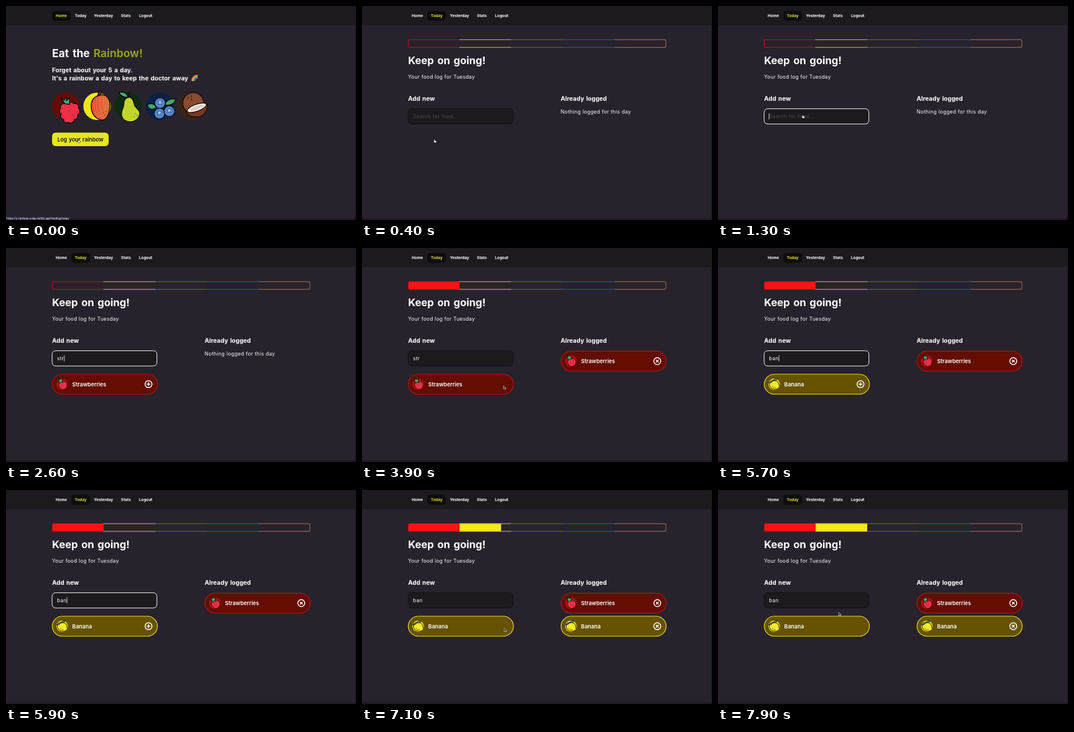
An HTML page that plays this animation: 600 by 368 pixels, repeating every 8 s.

```html
<!DOCTYPE html>
<html lang="en">
<head>
<meta charset="utf-8">
<title>Eat the Rainbow</title>
<style>
  html, body { margin: 0; height: 100%; overflow: hidden; background: #28222c; }
  svg { display: block; width: 100vw; height: 100vh; font-family: Inter, sans-serif; fill: #fff; }
  .nav { font-size: 6.7px; font-weight: 700; }
  .title, .lead, .sub, .button { font-weight: 700; word-spacing: .1em; }
  .lead { font-size: 10.5px; }
  .sub { font-size: 10.5px; }
  .button { font-size: 9.2px; font-weight: 600; }
  .body { font-size: 8.6px; letter-spacing: .045em; }
  .label { font-size: 9.35px; font-weight: 600; }
  .status { font: 500 4.6px "Noto Sans", sans-serif; }
  .ink { stroke: #120d12; stroke-width: 1.5; stroke-linejoin: round; }
  .thin { stroke: #120d12; stroke-width: .9; stroke-linejoin: round; }
  .icon { fill: none; stroke: #fff; stroke-width: 1.5; }
</style>
</head>
<body>
<svg viewBox="0 0 600 368" xmlns="http://www.w3.org/2000/svg">
  <defs>
    <linearGradient id="spectrum" gradientUnits="userSpaceOnUse" x1="79" x2="521"></linearGradient>
    <linearGradient id="mangoSkin"><stop stop-color="#e8453f"/><stop offset="1" stop-color="#df7a3a"/></linearGradient>
    <clipPath id="barShape"><rect x="79" y="57.5" width="442" height="14" rx="3"/></clipPath>
    <g id="strawberry">
      <circle r="10" fill="#ad1118"/>
      <path class="thin" fill="#ee3048" d="M-5-4C0-7 9-5 8.500 2C8 7 3 10 0 9C-5 7-8 0-5-4Z"/>
      <path fill="#3fb56c" class="thin" d="M-8-6L-5-7L-6-10L-2-8L1-9L0-5L2-3L-2-4L-4-1L-5-5Z"/>
      <path stroke="#7a1022" stroke-width=".9" stroke-dasharray=".8 2" d="M-2 0L3 6M2-2L6 2"/>
    </g>
    <g id="lemon">
      <circle r="10" fill="#d9cb12"/>
      <path class="thin" fill="#f6eb25" d="M-3-6C3-8 9-3 8.500 3Q10 6 7 7C2 11-7 8-8 1C-8-3-6-5-3-6Z"/>
      <path class="thin" fill="#3fa356" d="M-2-6Q-8-6-9-2Q-4-2-2-6ZM-2-6Q1-11 5-9Q3-5-2-6Z"/>
      <path fill="none" stroke="#3a3208" stroke-width=".7" d="M-4 3Q-2 7 3 6"/>
    </g>
  </defs>

  <rect width="600" height="368" fill="#28222c"/>
  <rect width="600" height="33" fill="#1c1a1e"/>
  <path d="M0 366.500H600M599.500 0V368" stroke="#1f1524" stroke-width="2"/>
  <rect id="pill" y="8.500" width="32" height="17" rx="5" fill="#0d0c0e"/>
  <g id="nav" class="nav"></g>

  <g id="home">
    <text class="title" x="79" y="87.500" font-size="18.600">Eat the <tspan fill="#919d19">Rainbow!</tspan></text>
    <text class="lead" x="79" y="114.300">Forget about your 5 a day.</text>
    <text class="lead" x="79" y="127.800">It's a rainbow a day to keep the doctor away</text>
    <g id="rainbow" fill="none" stroke-width="1.300"></g>
    <g id="discs"></g>

    <g class="ink">
      <path fill="#ee3048" d="M93 176C92 169 99 166 104 168C108 164 114 165 116 168C121 166 126 171 124 175C128 179 127 185 123 187C124 192 121 195 117 195C116 201 110 203 107 200C102 202 98 199 99 195C94 194 92 189 95 186C91 184 91 179 93 176Z"/>
      <path fill="#3fb57c" d="M94 158L100 162L102 156L104 163L109 157L109 169L101 168Z"/>
    </g>
    <path fill="none" stroke="#7a1022" stroke-width="1.500" stroke-linecap="round" d="M114 188h0M119 186h0M117 191h0M109 180h0"/>

    <g class="ink">
      <path fill="url(#mangoSkin)" d="M159 154C169 149 178 157 178 170C178 185 172 197 164 196C154 195 146 186 146 172C146 162 151 156 159 154Z"/>
      <path fill="#6b2a1c" d="M157 154L160 145L164 146L162 153Z"/>
    </g>
    <path fill="none" stroke="#e7b13a" stroke-width="1.300" stroke-dasharray="1.300 2" d="M150 166Q149 180 159 191M155 160Q152 177 164 191M161 158Q158 177 168 189M167 158Q167 174 171 184"/>
    <path fill="none" stroke="#3a1410" stroke-width="1.500" stroke-linecap="round" d="M167 184h0M171 181h0M169 188h0"/>

    <g class="ink">
      <path fill="#c1d52b" d="M210 157C217 156 219 164 220 170C222 177 231 178 229 187C227 196 219 200 211 199C203 198 198 193 198 185C198 178 202 175 202 169C202 162 204 158 210 157Z"/>
      <path fill="none" d="M210 158Q209 151 213 146"/>
      <path fill="#3fb56c" d="M209 157Q196 157 194 148Q207 147 209 157Z"/>
    </g>
    <path fill="none" stroke="#4a5a12" stroke-width="1.500" stroke-linecap="round" d="M221 185h0M225 188h0M220 190h0"/>

    <g class="ink" fill="#3fa96c">
      <path d="M258 175Q246 182 242 170Q253 164 258 175Z"/>
      <path d="M272 170Q276 158 291 160Q288 173 272 170Z"/>
    </g>
    <g id="blueberries"></g>

    <g class="ink">
      <circle cx="321" cy="167" r="18" fill="#8a4b2e"/>
      <path fill="#75391f" d="M309 182Q317 172 345 169C347 180 338 191 327 191C318 191 311 188 309 182Z"/>
      <ellipse cx="327" cy="175" rx="17.500" ry="6" transform="rotate(-20 327 175)" fill="#f7ece2"/>
    </g>
    <ellipse cx="327" cy="175" rx="12" ry="3" transform="rotate(-20 327 175)" fill="#e2cfc2"/>
    <path fill="none" stroke="#2b140c" stroke-width="2.300" stroke-linecap="round" d="M312 158h0M318 155h0M318 161h0"/>

    <rect x="79" y="217.800" width="97" height="23.200" rx="6" fill="#e6e71c"/>
    <text class="button" x="88" y="232.600" fill="#15120f">Log your rainbow</text>
    <rect y="361.500" width="111" height="6.500" fill="#27233a"/>
    <text class="status" x="1" y="366.600">https://a-rainbow-a-day.netlify.app/foodlog/today</text>
  </g>

  <g id="today">
    <g id="fills" clip-path="url(#barShape)"></g>
    <rect x="79.300" y="57.800" width="441.700" height="13.400" rx="3" fill="none" stroke="url(#spectrum)" stroke-width="1.200"/>
    <text class="title" x="79" y="99.500" font-size="17.700">Keep on going!</text>
    <text class="body" x="79" y="124.800">Your food log for Tuesday</text>
    <text class="sub" x="79" y="163.400">Add new</text>
    <text class="sub" x="340.500" y="163.400">Already logged</text>
    <text id="nothing" class="body" x="340.500" y="185">Nothing logged for this day</text>
    <rect id="field" x="79.100" y="176.700" width="179.600" height="26.200" rx="6" fill="#1c1a1e"/>
    <rect id="selection" x="87.300" y="184.300" width="12.700" height="11" fill="#5c82b8"/>
    <text id="query" class="body" x="87.500" y="192.700"></text>
    <rect id="caret" y="184.500" width=".8" height="10.500"/>
    <g id="cards"></g>
  </g>

  <g id="cursor">
    <path id="arrow" fill="#17141b" stroke="#c5d3d8" stroke-width=".8" d="M0 0V5.500L1.400 4.300L2.500 6.300L3.500 5.800L2.600 4H4.200Z"/>
    <path id="hand" fill="#fff" stroke="#17141b" stroke-width=".7" d="M-1.500-2.500Q-.5-3.200 0-2V-.8L2.200-.3Q3 0 2.700 1.300L2 3H-1L-2.800.8L-1.500.5Z"/>
  </g>
</svg>
<script>
const $ = id => document.getElementById(id);
const show = (element, visible) => element.style.display = visible ? '' : 'none';

const LOOP = 8000;
const PAGE_CHANGE = 400;
const SEGMENT = 442 / 5;

const navItems = [['Home', 85.300], ['Today', 118], ['Yesterday', 150.800], ['Stats', 197], ['Logout', 228]];
$('nav').innerHTML = navItems.map(([name, x]) => `<text x="${x}" y="19.200">${name}</text>`).join('');

$('spectrum').innerHTML = ['#b51119', '#b8ad20', '#52701c', '#2455a3', '#94694c'].map((color, i) =>
  `<stop offset="${i / 5}" stop-color="${color}"/><stop offset="${(i + 1) / 5}" stop-color="${color}"/>`).join('');

$('rainbow').innerHTML = ['#e8463c', '#f0983a', '#f3df4a', '#58b858', '#3c8fe0', '#9155c4'].map((color, i) => {
  const r = 10.500 - i * 1.150;
  return `<path stroke="${color}" d="M${328.500 - r} 129A${r} ${r} 0 0 1 328.500 ${129 - r}"/>`;
}).join('');

$('discs').innerHTML = ['#640d08', '#f3e718', '#0c2b10', '#07214b', '#392418'].map((color, i) =>
  `<circle cx="${102.500 + i * 53.600}" cy="172.500" r="23.500" fill="${color}"/>`).join('');

$('blueberries').innerHTML = [[264, 167], [263, 185], [280, 181]].map(([x, y]) =>
  `<g transform="translate(${x} ${y})"><circle class="ink" r="9.200" fill="#5288cd"/>
   <path fill="#a9cbed" stroke="#23406e" stroke-width=".7" d="M0-6L1.500-3L5-3L2-1L3 3L0 1L-3 3L-2-1L-5-3L-1.500-3Z"/></g>`).join('');

const foods = {
  Strawberries: { icon: 'strawberry', fill: '#640d00', stroke: '#b81319' },
  Banana: { icon: 'lemon', fill: '#665200', stroke: '#e9df28' }
};

const plus = 'M-3.300 0H3.300M0-3.300V3.300';
const cross = 'M-2.300-2.300L2.300 2.300M2.300-2.300L-2.300 2.300';

function addCard(name, x, y, symbol) {
  const { icon, fill, stroke } = foods[name];
  const card = document.createElementNS('http://www.w3.org/2000/svg', 'g');
  card.setAttribute('transform', `translate(${x} ${y})`);
  card.innerHTML = `
    <rect width="180.300" height="34.500" rx="17.250" fill="${fill}" stroke="${stroke}" stroke-width="1.200"/>
    <use href="#${icon}" x="17" y="17.200"/>
    <text class="label" x="34.300" y="20.600">${name}</text>
    <g class="icon" transform="translate(165 17.200)"><circle r="5.900"/><path d="${symbol}"/></g>`;
  $('cards').append(card);
  return card;
}

// Times: result found, result replaced, food logged.
const entries = [
  { name: 'Strawberries', found: 2500, gone: 5300, logged: 3600, color: '#fb1414' },
  { name: 'Banana', found: 5700, gone: LOOP, logged: 6900, color: '#f5e820' }
].map((entry, i) => ({
  ...entry,
  result: addCard(entry.name, 79.300, 217, plus),
  log: addCard(entry.name, 341.200, 177.300 + i * 39.700, cross)
}));

$('fills').innerHTML = entries.map((entry, i) =>
  `<rect x="${79 + i * SEGMENT}" y="57" height="15" fill="${entry.color}"/>`).join('');

const typing = [[0, ''], [2100, 's'], [2250, 'st'], [2400, 'str'], [5300, 'b'], [5450, 'ba'], [5600, 'ban']];
const focusSpans = [[1100, 3600], [4400, 6900]];
const cursorPath = [
  [0, 125, 232], [500, 125, 232], [950, 146, 190], [2900, 146, 190], [3450, 244, 238], [3850, 244, 238],
  [4400, 190, 197], [6000, 190, 197], [6650, 244, 238], [7200, 244, 238], [7800, 207, 210.500], [LOOP, 207, 210.500]
];
const handSpans = [[0, 500], [850, 2900], [3350, 3600], [4300, 6100], [6550, 6900]];

const within = (t, spans) => spans.find(([from, to]) => t >= from && t < to);
const clamp = v => Math.max(0, Math.min(1, v));

function cursorAt(t) {
  const i = cursorPath.findIndex(([time]) => time > t);
  const [t0, x0, y0] = cursorPath[i - 1], [t1, x1, y1] = cursorPath[i];
  const p = (t - t0) / (t1 - t0), eased = p * p * (3 - 2 * p);
  return [x0 + (x1 - x0) * eased, y0 + (y1 - y0) * eased];
}

function drawNav(onHome) {
  $('pill').setAttribute('x', onHome ? 79 : 112);
  [...$('nav').children].forEach((item, i) =>
    item.setAttribute('fill', i === (onHome ? 0 : 1) ? '#e6df22' : '#fff'));
}

function drawField(t) {
  const focus = within(t, focusSpans);
  const [typedAt, text] = typing.filter(([time]) => time <= t).pop();
  const selected = t >= 4500 && t < 5300;
  $('field').setAttribute('stroke', focus ? '#fff' : '#131115');
  $('query').textContent = text || 'Search for food...';
  $('query').setAttribute('fill', text ? '#fff' : '#4b474e');
  show($('selection'), selected);
  const blinkStart = focus ? Math.max(focus[0], typedAt) : 0;
  show($('caret'), focus && !selected && (t - blinkStart) % 1000 < 500);
  $('caret').setAttribute('x', text ? 87.700 + $('query').getComputedTextLength() : 87.300);
}

function drawFoods(t) {
  show($('nothing'), t < entries[0].logged);
  entries.forEach((entry, i) => {
    show(entry.result, t >= entry.found && t < entry.gone);
    show(entry.result.querySelector('.icon'), t < entry.logged);
    show(entry.log, t >= entry.logged);
    $('fills').children[i].setAttribute('width', SEGMENT * clamp((t - entry.logged) / 250));
  });
}

function drawCursor(t) {
  const hand = within(t, handSpans);
  show($('cursor'), !within(t, [[2100, 2900], [5300, 6000]]));
  show($('hand'), hand);
  show($('arrow'), !hand);
  $('cursor').setAttribute('transform', `translate(${cursorAt(t)})`);
}

function frame(now) {
  const t = now % LOOP, onHome = t < PAGE_CHANGE;
  show($('home'), onHome);
  show($('today'), !onHome);
  drawNav(onHome);
  drawField(t);
  drawFoods(t);
  drawCursor(t);
  requestAnimationFrame(frame);
}
frame(performance.now());
</script>
</body>
</html>
```
